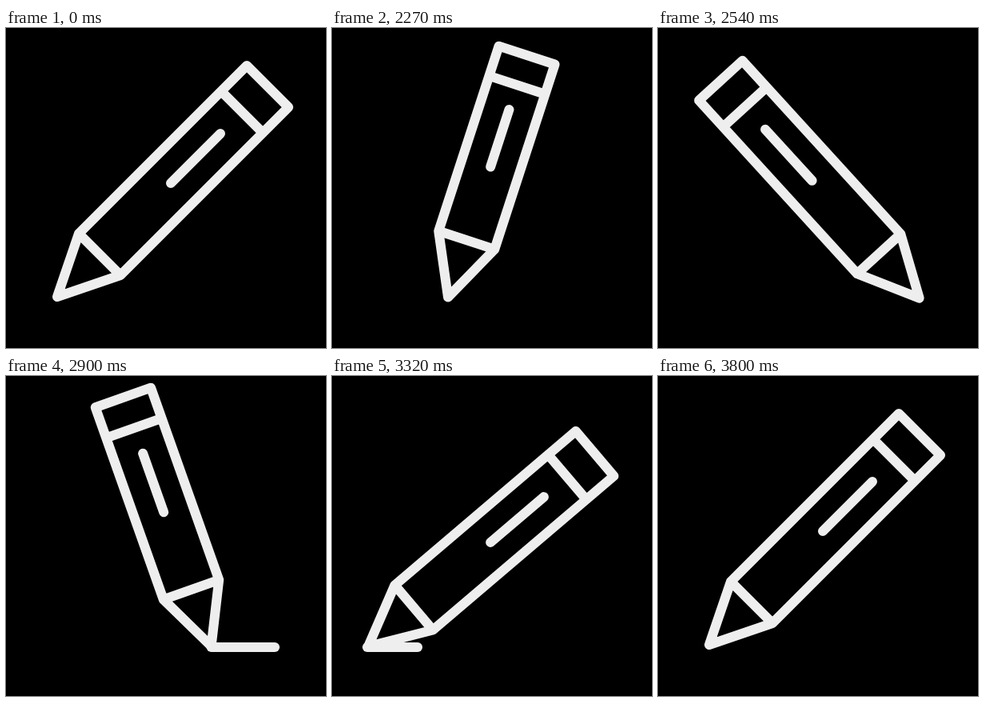
Recreate the animation shown at these times as an HTML page. Size 400 by 400 pixels, loop 3.83 s.

```html
<!DOCTYPE html>
<html lang="en">
<head>
<meta charset="utf-8">
<title>Pencil</title>
<style>
  html, body { margin: 0; height: 100%; overflow: hidden; background: #000; }
  svg { display: block; width: 100%; height: 100%; }
  path { fill: none; stroke: #eee; stroke-width: 12; stroke-linecap: round; stroke-linejoin: round; }
</style>
</head>
<body>
<svg viewBox="0 0 400 400">
  <path id="trail"/>
  <path id="pencil"/>
</svg>
<script>
const LOOP = 3830, STEP = 30;
const trail = document.getElementById('trail');
const pencil = document.getElementById('pencil');

// Cubic bezier easing with control points (x1, 0) and (x2, 1)
const bezier = (x1, x2) => x => {
  let lo = 0, hi = 1;
  for (let i = 0; i < 24; i++) {
    const s = (lo + hi) / 2, r = 1 - s;
    if (3 * r * r * s * x1 + 3 * r * s * s * x2 + s ** 3 < x) lo = s; else hi = s;
  }
  return lo * lo * (3 - 2 * lo);
};
const slowIn = bezier(0.54, 0.65);
const softOut = bezier(0.54, 0.5);
const smooth = bezier(1 / 3, 2 / 3);
const mix = (a, b, p) => a + (b - a) * p;

// Each key: [time, value, easing towards that value]
function track(keys, t) {
  const i = keys.findIndex(k => t < k[0]);
  if (i < 0) return keys[keys.length - 1][1];
  if (i === 0) return keys[0][1];
  const [t0, a] = keys[i - 1], [t1, b, ease] = keys[i];
  return mix(a, b, ease((t - t0) / (t1 - t0)));
}

const moves = (a, b, c) => [
  [2000, a], [2600, b, slowIn], [2750, b, smooth],
  [3190, c, smooth], [3350, c, smooth], [3800, a, smooth]
];
const tipX = moves(64, 334.5, 45.2);
const tipY = moves(336, 337.7, 338.1);
const angle = moves(45, -45, 49.6);
const squash = [
  [2000, 0], [2300, 1, slowIn], [2600, 0, softOut],
  [2750, 0, smooth], [2970, 1, smooth], [3190, 0, smooth]
];
const trailEnd = [[2900, 336], [3500, 44, smooth]];

function draw(time) {
  let t = time % LOOP;
  t -= (t - 20) % STEP;
  const x = track(tipX, t), y = track(tipY, t), k = track(squash, t);
  const top = mix(372, 316.5, k), band = mix(326.7, 277.5, k);
  const slotLow = mix(200.8, 170.5, k), slotHigh = mix(288.5, 245.5, k);

  pencil.setAttribute('transform', `translate(${x} ${y}) rotate(${track(angle, t)})`);
  pencil.setAttribute('d',
    `M0 0L-36.8-75V${-top}H36.8V-75ZM-36.8-75H36.8` +
    `M-36.8 ${-band}H36.8M0 ${-slotLow}V${-slotHigh}`);

  const left = t < 3190 ? x : 44;
  const visible = t > 2750 && t < 3500;
  trail.setAttribute('d', visible ? `M${left} 339H${track(trailEnd, t)}` : '');
}

const start = performance.now();
function tick() {
  draw(performance.now() - start);
  requestAnimationFrame(tick);
}
tick();
</script>
</body>
</html>
```
